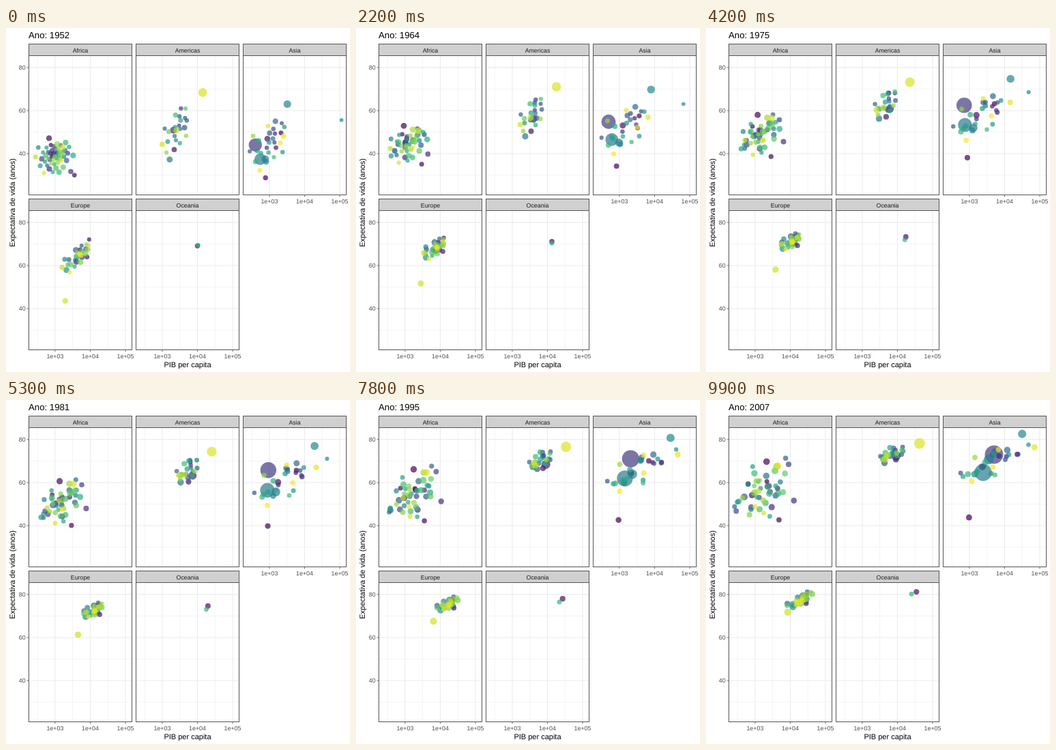
Recreate the animation shown at these times as an HTML page. Size 504x504 px, loop 10 s.

```html
<!DOCTYPE html>
<html lang="pt">
<head>
<meta charset="utf-8">
<style>
html, body { margin: 0; width: 100%; height: 100%; overflow: hidden; background: #fff; }
svg {
  display: block; width: 504px; height: 504px;
  font-family: "Liberation Sans", Arial, sans-serif; text-rendering: geometricPrecision;
}
.tick { font-size: 8.9px; fill: #4d4d4d; }
.strip { font-size: 8.8px; fill: #1a1a1a; }
.axis { font-size: 11px; }
.title { font-size: 13.2px; }
</style>
</head>
<body>
<svg id="stage" viewBox="0 0 504 504"></svg>
<script>
const stage = document.getElementById('stage');

function el(tag, attrs, parent = stage, text = '') {
  const node = document.createElementNS('http://www.w3.org/2000/svg', tag);
  for (const k in attrs) node.setAttribute(k, attrs[k]);
  node.textContent = text;
  return parent.appendChild(node);
}
const label = (cls, x, y, text, anchor = 'middle', extra = {}) =>
  el('text', { class: cls, x, y, 'text-anchor': anchor, ...extra }, stage, text);
const line = (x1, y1, x2, y2, stroke, width) =>
  el('line', { x1, y1, x2, y2, stroke, 'stroke-width': width });
const box = (x, y, width, height, fill) =>
  el('rect', { x, y, width, height, fill, stroke: '#555' });

// Panels and scales: log10 income across, years of life up
const W = 151, H = 204, STRIP = 17;
const panels = ['Africa', 'Americas', 'Asia', 'Europe', 'Oceania'].map((name, i) =>
  ({ name, x: 33.5 + (i % 3) * 157, y: i < 3 ? 40.5 : 267.5 }));
const [africa, americas, asia, europe, oceania] = panels;
const px = (panel, income) => panel.x + 38.4 + (income - 3) * 51.55;
const py = (panel, life) => panel.y + 17.4 + (80 - life) * 3.154;

for (const p of panels) {
  const vline = (v, w) => line(px(p, v), p.y, px(p, v), p.y + H, '#ebebeb', w);
  const hline = (v, w) => line(p.x, py(p, v), p.x + W, py(p, v), '#ebebeb', w);
  [2.5, 3.5, 4.5].forEach(v => vline(v, 0.55));
  [30, 50, 70].forEach(v => hline(v, 0.55));
  [3, 4, 5].forEach(v => vline(v, 1.07));
  [40, 60, 80].forEach(v => hline(v, 1.07));
  p.layer = el('g', { 'fill-opacity': 0.7 });
}
panels.forEach((p, i) => {
  box(p.x, p.y, W, H, 'none');
  box(p.x, p.y - STRIP, W, STRIP, '#d0d0d0');
  label('strip', p.x + W / 2, p.y - 5, p.name);
  if (i > 1) [3, 4, 5].forEach(v => {
    line(px(p, v), p.y + H, px(p, v), p.y + H + 3, '#555', 0.85);
    label('tick', px(p, v), p.y + H + 12.5, `1e+0${v}`);
  });
  if (i % 3 === 0) [40, 60, 80].forEach(v => {
    line(p.x - 3, py(p, v), p.x, py(p, v), '#555', 0.85);
    label('tick', p.x - 4.8, py(p, v) + 3.2, v, 'end');
  });
});
label('axis', 266, 497, 'PIB per capita');
label('axis', 0, 0, 'Expectativa de vida (anos)', 'middle', { transform: 'translate(13.3 256) rotate(-90)' });
const title = label('title', 33, 15, '', 'start');

const viridis = ['440154', '482475', '414487', '355f8d', '2a788e', '21908c',
  '22a884', '43bf71', '7ad151', 'bbdf27', 'fde725']
  .map(h => [0, 2, 4].map(i => parseInt(h.slice(i, i + 2), 16)));
function colour(tone) {
  const i = Math.min(9, Math.floor(tone * 10)), t = tone * 10 - i;
  return `rgb(${viridis[i].map((c, k) => Math.round(c + (viridis[i + 1][k] - c) * t))})`;
}

// Smooth curve through a start, middle and end value
const curve = ([a, b, c], t) =>
  a * (2 * t - 1) * (t - 1) + b * 4 * t * (1 - t) + c * t * (2 * t - 1);

let seed = 1952;
function random() {
  seed = (seed * 16807) % 2147483647;
  return seed / 2147483647;
}
// Bell-shaped offset from a number between 0 and 1
function bell(u) {
  const v = 0.02 + 0.96 * u;
  return Math.log(v / (1 - v)) / 1.75;
}

const dots = [];

// Large and outlying bubbles: tone, radius at both ends, path
function bubble(panel, tone, r0, r1, income, life) {
  dots.push({ panel, tone, at: t => [curve(income, t), curve(life, t), r0 + (r1 - r0) * t] });
}
bubble(asia, 0.17, 9.7, 13.5, [2.6, 2.93, 3.7], [44, 64.8, 73]);
bubble(asia, 0.41, 8.5, 12.6, [2.74, 2.92, 3.39], [37.4, 55.5, 64.7]);
bubble(asia, 0.42, 5.5, 7.2, [2.88, 3.16, 3.55], [37.5, 54.5, 70.7]);
bubble(asia, 0.47, 5.6, 6.1, [3.51, 4.25, 4.5], [63, 76.3, 82.6]);
bubble(asia, 0, 3.7, 4.5, [2.89, 2.95, 2.99], [28.8, 39.3, 43.8]);
bubble(asia, 0.5, 2.9, 3.3, [5.05, 4.65, 4.68], [55.6, 70.3, 77.6]);
bubble(americas, 0.95, 6.5, 7.9, [4.15, 4.39, 4.63], [68.4, 74, 78.2]);
bubble(americas, 0.1, 5, 6.9, [3.32, 3.84, 3.96], [50.9, 62.5, 72.4]);
bubble(europe, 0.93, 4.2, 5.3, [3.29, 3.63, 3.93], [43.6, 60.3, 71.8]);
bubble(africa, 0.02, 3.4, 3.9, [3.55, 3.46, 3.68], [30, 39.7, 42.7]);
bubble(oceania, 0.04, 3.7, 4.2, [4, 4.28, 4.54], [69.1, 74.2, 81.2]);
bubble(oceania, 0.65, 3.3, 3.4, [4.02, 4.24, 4.4], [69.4, 72.7, 80.2]);

// The rest of a panel: a sloped cloud whose members slowly trade places
function cloud(panel, count, { income, width, life, slope, height }) {
  for (let i = 0; i < count; i++) {
    const side = bell((0.5 + i * 0.7549) % 1), sideDrift = bell(random());
    const rise = bell((0.5 + i * 0.5698) % 1), riseDrift = bell(random());
    const size = 3 + 1.5 * random() ** 2;
    const at = t => {
      const c = Math.cos(0.7 * t), s = Math.sin(0.7 * t);
      const dx = curve(width, t) * (side * c + sideDrift * s);
      const dy = curve(slope, t) * dx + curve(height, t) * (rise * c + riseDrift * s);
      return [curve(income, t) + dx, curve(life, t) + dy, size * (1 + 0.15 * t)];
    };
    dots.push({ panel, tone: random(), at });
  }
}
cloud(africa, 51, {
  income: [3, 3.18, 3.22], width: [0.28, 0.35, 0.43],
  life: [39.3, 50.3, 55], slope: [4, 10, 9], height: [4.3, 5, 7.5]
});
cloud(americas, 23, {
  income: [3.48, 3.76, 3.87], width: [0.24, 0.23, 0.28],
  life: [53, 66, 73.6], slope: [22, 15, 8], height: [6, 4, 2.3]
});
cloud(asia, 27, {
  income: [3.1, 3.58, 3.85], width: [0.33, 0.47, 0.53],
  life: [47, 62.5, 71.5], slope: [12, 10, 8], height: [6.3, 4.5, 3]
});
cloud(europe, 29, {
  income: [3.7, 4.12, 4.35], width: [0.25, 0.19, 0.23],
  life: [65.3, 72.7, 78], slope: [14, 7, 8], height: [2.8, 1.6, 1.2]
});

dots.sort((a, b) => a.tone - b.tone);
for (const dot of dots) dot.node = el('circle', { fill: colour(dot.tone) }, dot.panel.layer);

const STEPS = 100, STEP_MS = 100;
function draw(step) {
  const t = step / (STEPS - 1);
  title.textContent = `Ano: ${Math.round(1952 + 55 * t)}`;
  for (const { node, panel, at } of dots) {
    const [income, life, r] = at(t);
    node.setAttribute('cx', px(panel, income).toFixed(2));
    node.setAttribute('cy', py(panel, life).toFixed(2));
    node.setAttribute('r', r.toFixed(2));
  }
}

const start = performance.now();
let shown = -1;
function tick() {
  const step = Math.floor((performance.now() - start) / STEP_MS) % STEPS;
  if (step !== shown) draw(shown = step);
  requestAnimationFrame(tick);
}
tick();
</script>
</body>
</html>
```
